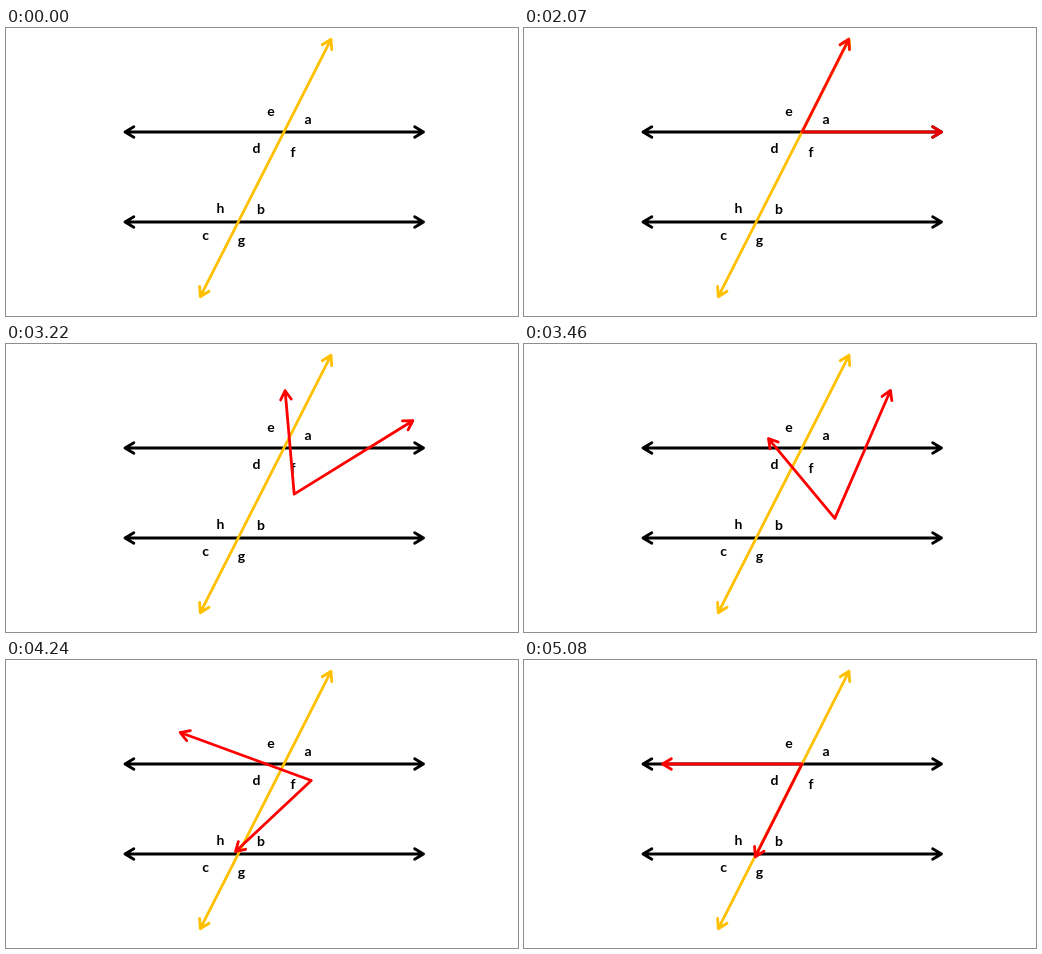
An HTML page with a canvas for the animation above (8220 ms loop, 512 by 288 pixels).

```html
<!DOCTYPE html>
<html lang="en">
<head>
<meta charset="utf-8">
<title>Alternate angles between parallel lines</title>
<style>
  html, body { margin: 0; width: 100%; height: 100%; overflow: hidden; background: #fff; }
  canvas { display: block; width: 100%; height: 100%; }
</style>
</head>
<body>
<canvas id="stage" width="512" height="288"></canvas>
<script>
const ctx = document.getElementById('stage').getContext('2d');
const LOOP = 8220, TICK = 60;
const FADE_START = 870, FADE_TICKS = 23;
const TURN_START = 2980, TURN_TICKS = 36;

const vertex = [278, 104], longTip = [417.5, 104], shortTip = [324.7, 11.3];
// The angle spins about the centre of its bounding box while that centre slides.
const startCentre = [347.8, 57.7];
const endCentre = vertex.map((v, i) => 2 * v - startCentre[i]);

const labels = [
  ['e', 265, 88], ['a', 302, 96], ['d', 250.5, 125], ['f', 287, 129],
  ['h', 214.5, 185], ['b', 255, 186], ['c', 199.5, 212], ['g', 235.5, 217]
];

function addRay([x0, y0], [x1, y1]) {
  const direction = Math.atan2(y1 - y0, x1 - x0);
  const barb = side => [
    x1 - 10.3 * Math.cos(direction + side * 0.54),
    y1 - 10.3 * Math.sin(direction + side * 0.54)
  ];
  ctx.moveTo(x0, y0);
  ctx.lineTo(x1, y1);
  ctx.moveTo(...barb(1));
  ctx.lineTo(x1, y1);
  ctx.lineTo(...barb(-1));
}

function strokeRays(color, ...rays) {
  ctx.strokeStyle = color;
  ctx.beginPath();
  rays.forEach(([from, to]) => addRay(from, to));
  ctx.stroke();
}

const strokeLine = (color, a, b) => strokeRays(color, [a, b], [b, a]);

// Ticks elapsed since start, counting the first change as tick 1.
const ticksSince = (time, start, count) =>
  Math.max(0, Math.min(count, Math.floor((time - start) / TICK) + 1));

// Quick acceleration, steady speed, then a long slowdown.
function turnProgress(tick) {
  const speed = 0.0483, ramp = 2.7, brake = 16;
  if (tick < ramp) return speed * tick * tick / (2 * ramp);
  const steady = speed * (Math.min(tick, brake) - ramp / 2);
  if (tick <= brake) return steady;
  return 1 - (1 - steady) * ((TURN_TICKS - tick) / (TURN_TICKS - brake)) ** 2.7;
}

function drawAngle(progress, opacity) {
  const cos = Math.cos(progress * Math.PI), sin = Math.sin(progress * Math.PI);
  const centre = startCentre.map((v, i) => v + (endCentre[i] - v) * progress);
  const place = ([x, y]) => {
    const dx = x - startCentre[0], dy = y - startCentre[1];
    return [centre[0] + dx * cos + dy * sin, centre[1] - dx * sin + dy * cos];
  };
  const corner = place(vertex);
  ctx.globalAlpha = opacity;
  strokeRays('#f00', [corner, place(longTip)], [corner, place(shortTip)]);
  ctx.globalAlpha = 1;
}

function draw(time) {
  ctx.fillStyle = '#fff';
  ctx.fillRect(0, 0, 512, 288);
  ctx.lineWidth = 2.8;
  ctx.lineCap = ctx.lineJoin = 'round';
  for (const y of [104, 194]) strokeLine('#000', [119, y], [417.5, y]);
  strokeLine('#ffc000', [325, 11.3], [194.3, 268.7]);

  ctx.fillStyle = '#000';
  ctx.font = 'bold 14px Lato, sans-serif';
  ctx.textAlign = 'center';
  for (const [letter, x, y] of labels) ctx.fillText(letter, x, y);

  const opacity = ticksSince(time, FADE_START, FADE_TICKS) / FADE_TICKS;
  if (opacity) drawAngle(turnProgress(ticksSince(time, TURN_START, TURN_TICKS)), opacity);
}

const origin = performance.now();
function frame() {
  draw((performance.now() - origin) % LOOP);
  requestAnimationFrame(frame);
}
frame();
</script>
</body>
</html>
```
